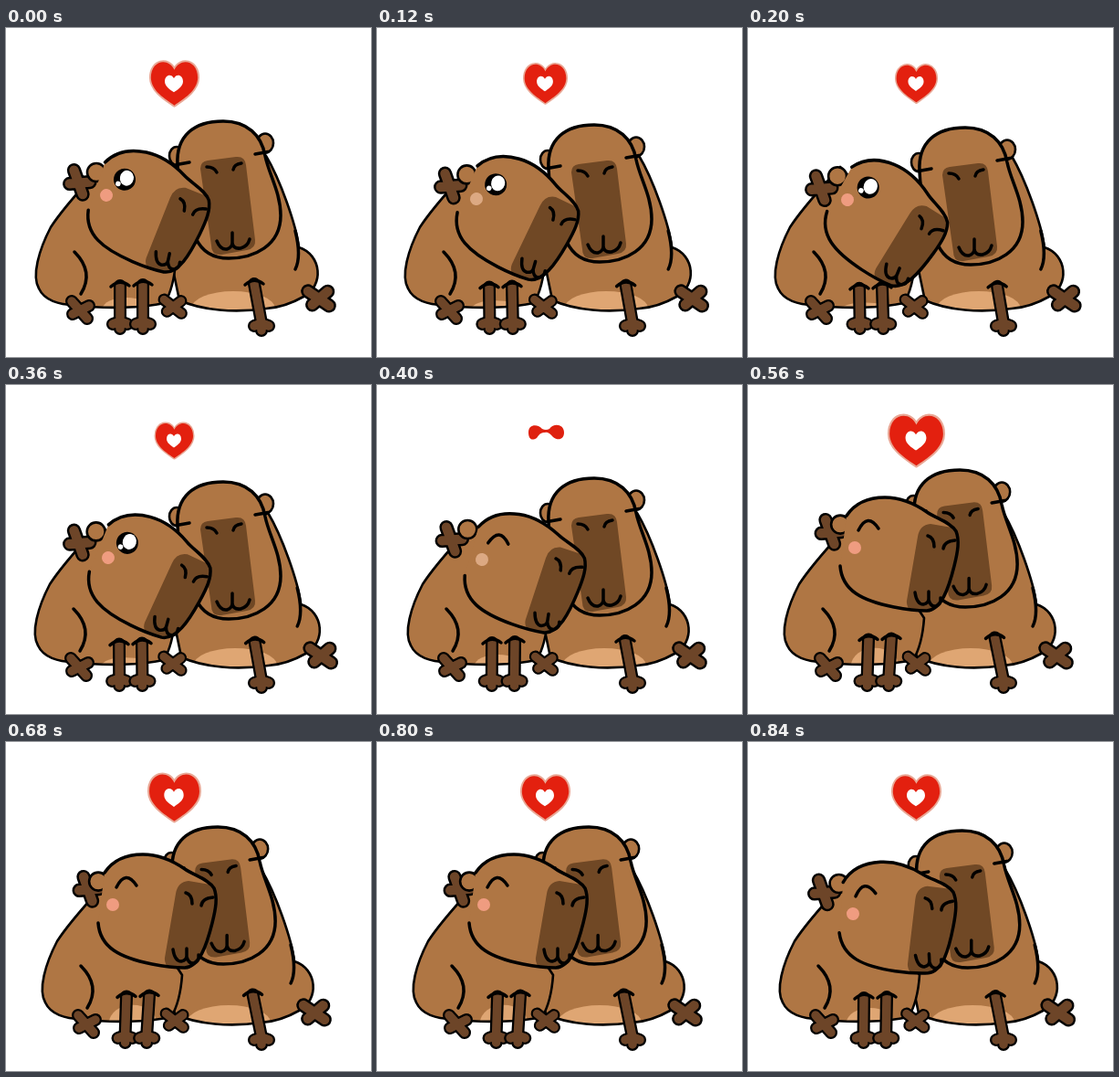
An HTML page with a canvas for the animation above (0.92 s loop, 400x360 px).

```html
<!DOCTYPE html>
<html>
<head>
<meta charset="utf-8">
<title>Cuddling capybaras</title>
<style>
html, body { margin: 0; width: 100%; height: 100%; overflow: hidden; background: #fff; }
canvas { display: block; }
</style>
</head>
<body>
<canvas id="stage" width="400" height="360"></canvas>
<script>
const ctx = document.getElementById('stage').getContext('2d');
const FUR = '#af7644', DARK = '#704825', PAW = '#6d4528', BELLY = '#dfa673';
const PINK = '#ef9c80', PALE = '#dca983';
const LOOP = 920;

// start ms, cheek x, cheek y, head tilt, left body dx, right head dy, heart scale, blush
const poses = [
  [0, 110, 183, 12, 0, 0, 1, PINK],
  [120, 109, 187, 16, -2, 4, .89, PALE],
  [200, 109, 188, 22, -3, 7, .855, PINK],
  [360, 112, 189, 15, -1, 4, .8, PINK],
  [400, 115, 191, 8.5, 1, 0, 0, PALE],
  [480, 116, 187, -1, 3, -5, .95, PINK],
  [560, 117, 178, 0, 7, -9, 1.145, PINK],
  [680, 117, 178, 0, 7, -9, 1.07, PINK],
  [800, 117, 178, 0, 7, -9, 1, PINK],
  [840, 115, 188, -3, 2, -5, 1, PINK]
];

const P = d => new Path2D(d);
const shapes = {
  bodyR: P('M285 140C300 165 318 215 321 240C346 248 349 282 326 294C312 302 300 306 285 307C250 312 215 309 190 298L180 250L220 180Z'),
  flankR: P('M317 222Q324 250 317 264'),
  headR: P('M188 150C186 118 206 102 238 102C264 102 280 117 284 140C288 160 301 180 301 205C301 238 272 252 244 252C225 252 214 243 208 230C198 205 189 180 188 150Z'),
  snoutR: P('M213 154Q213 146 221 145L252 141Q262 140 263 150L273 232Q274 241 264 243L236 248Q225 249 225 238Z'),
  faceR: P('M220 152Q228 152 231 158M249 155Q250 149 258 148M231 233Q235 243 242 242Q248 240 248 235V224M248 235Q249 242 257 241Q265 239 267 231'),
  browsR: P('M187 149.5L201 147M273 138L287 135.5'),
  bodyL: P('M104 152C92 166 66 192 49 218C36 243 28 271 36 285C42 298 58 303 75 303C110 308 150 306 174 301Q184 284 186 255L150 200Z'),
  armL: P('M75 245Q97 267 82 291'),
  headL: P('M101 198C103 225 125 236 160 243C175 246 185 247 196 247C212 246 220 222 226 198C230 182 232 170 228 160C222 150 206 146 196 139C180 128 166 123 150 123C130 123 116 131 108 143'),
  snoutL: P('M174 236L186 166Q188 153 200 152L235 158V250H186Q173 247 174 236Z'),
  faceL: P('M197 165Q204 167 204 177M214 179Q215 171 227 170M183 227Q185 240 192 240Q198 239 198 234V226M198 235Q200 243 206 242Q212 240 211 233'),
  lid: P('M121 159Q131 139 143 157'),
  heart: P('M0-16C-7-31-27-27-27-7C-27 8-10 18 0 25C10 18 27 8 27-7C27-27 7-31 0-16Z'),
  bow: P('M166 52C166 42 177 43 181 48Q185 50 189 48C194 41 205 43 205 52C205 60 198 61 193 57Q188 51 184 52Q179 51 175 58C169 62 166 58 166 52Z'),
  cross: P('M-10-9L7 10M9-4L-9 5'),
  toes: P('M-8-5L0-8L8-5M0-8V0')
};

function at(x, y, draw, angle = 0, scale = 1) {
  ctx.save();
  ctx.translate(x, y);
  ctx.rotate(angle * Math.PI / 180);
  ctx.scale(scale, scale);
  draw();
  ctx.restore();
}

function fill(path, color) {
  ctx.fillStyle = color;
  ctx.fill(path);
}

function line(path, width = 3.5, color = '#000') {
  ctx.lineWidth = width;
  ctx.strokeStyle = color;
  ctx.stroke(path);
}

function outlined(path, color, width) {
  fill(path, color);
  line(path, width);
}

function disc(x, y, rx, ry = rx) {
  const path = new Path2D();
  path.ellipse(x, y, rx, ry, 0, 0, 7);
  return path;
}

function limb(path) {
  line(path, 14);
  line(path, 9.5, PAW);
}

function cross(x, y, angle, scale = 1) {
  at(x, y, () => limb(shapes.cross), angle, scale);
}

function leg(x, top, footX, footY) {
  const path = P(`M${x} ${top}L${footX} ${footY - 8}`);
  path.addPath(shapes.toes, new DOMMatrix([1, 0, 0, 1, footX, footY]));
  limb(path);
  line(P(`M${x - 10} ${top + 1}Q${x} ${top - 8} ${x + 10} ${top}`));
}

// Body with a belly patch kept inside it
function body(path, x, rx, ry) {
  fill(path, FUR);
  ctx.save();
  ctx.clip(path);
  fill(disc(x, 307, rx, ry), BELLY);
  ctx.restore();
  line(path, 2.6);
}

function drawRight(dy) {
  const lean = dy * .55, rise = Math.min(0, dy);
  at(lean, 0, () => {
    body(shapes.bodyR, 249, 46, 19);
    line(shapes.flankR);
    cross(344, 295, -14, 1.1);
  });
  leg(272 + lean * .3, 280 + dy * .4, 280, 331);
  at(rise * .65, dy, () => {
    outlined(disc(284, 126, 9, 10.5), FUR, 2.6);
    outlined(disc(187, 140, 8, 10), FUR, 2.6);
    outlined(shapes.headR, FUR);
    line(shapes.browsR);
    ctx.translate(0, rise * .4);
    fill(shapes.snoutR, DARK);
    line(shapes.faceR);
  });
}

function drawLeftHead(open, blush) {
  fill(shapes.headL, FUR);
  ctx.save();
  ctx.clip(shapes.headL);
  fill(shapes.snoutL, DARK);
  ctx.restore();
  line(shapes.headL);
  line(shapes.faceL);
  fill(disc(117, 178, 7), blush);
  if (open) {
    fill(disc(133, 157, 12), '#000');
    fill(disc(135, 155, 7.5, 8.5), '#fff');
    fill(disc(127, 163, 2.8), '#fff');
  } else {
    line(shapes.lid);
  }
}

function drawHeart(scale) {
  if (!scale) return fill(shapes.bow, '#df210f');
  at(184.5, 61, () => {
    line(shapes.heart, 4, '#e9a795');
    fill(shapes.heart, '#e3200f');
  }, 0, scale * .95);
  at(184, 61, () => fill(shapes.heart, '#fff'), 0, scale * .37);
}

function draw(time) {
  const pose = poses.findLast(p => p[0] <= time);
  const [start, x, y, tilt, dx, dy, heart, blush] = pose;
  ctx.fillStyle = '#fff';
  ctx.fillRect(0, 0, 400, 360);
  ctx.lineCap = ctx.lineJoin = 'round';

  drawHeart(heart);
  drawRight(dy);
  at(dx, 0, () => {
    body(shapes.bodyL, 132, 26, 12 - dy * .8);
    line(shapes.armL);
    cross(82, 308, 0);
    leg(125, 282 + dy * .4, 125 - dx * .2, 329);
    leg(150, 281 + dy * .4, 150 - dx * .4, 329);
  });
  cross(184 + dx * .3, 304, -10, .95);
  cross(81 + Math.max(0, dx) * 1.5, 169 + dy * .9, 22, 1.1);
  outlined(disc(99 + dx * .3, 158 + dy * .6, 10), FUR, 2.6);
  at(x, y, () => {
    ctx.translate(-117, -178);
    drawLeftHead(start < 400, blush);
  }, tilt);
}

function tick() {
  draw(performance.now() % LOOP);
  requestAnimationFrame(tick);
}
tick();
</script>
</body>
</html>
```
